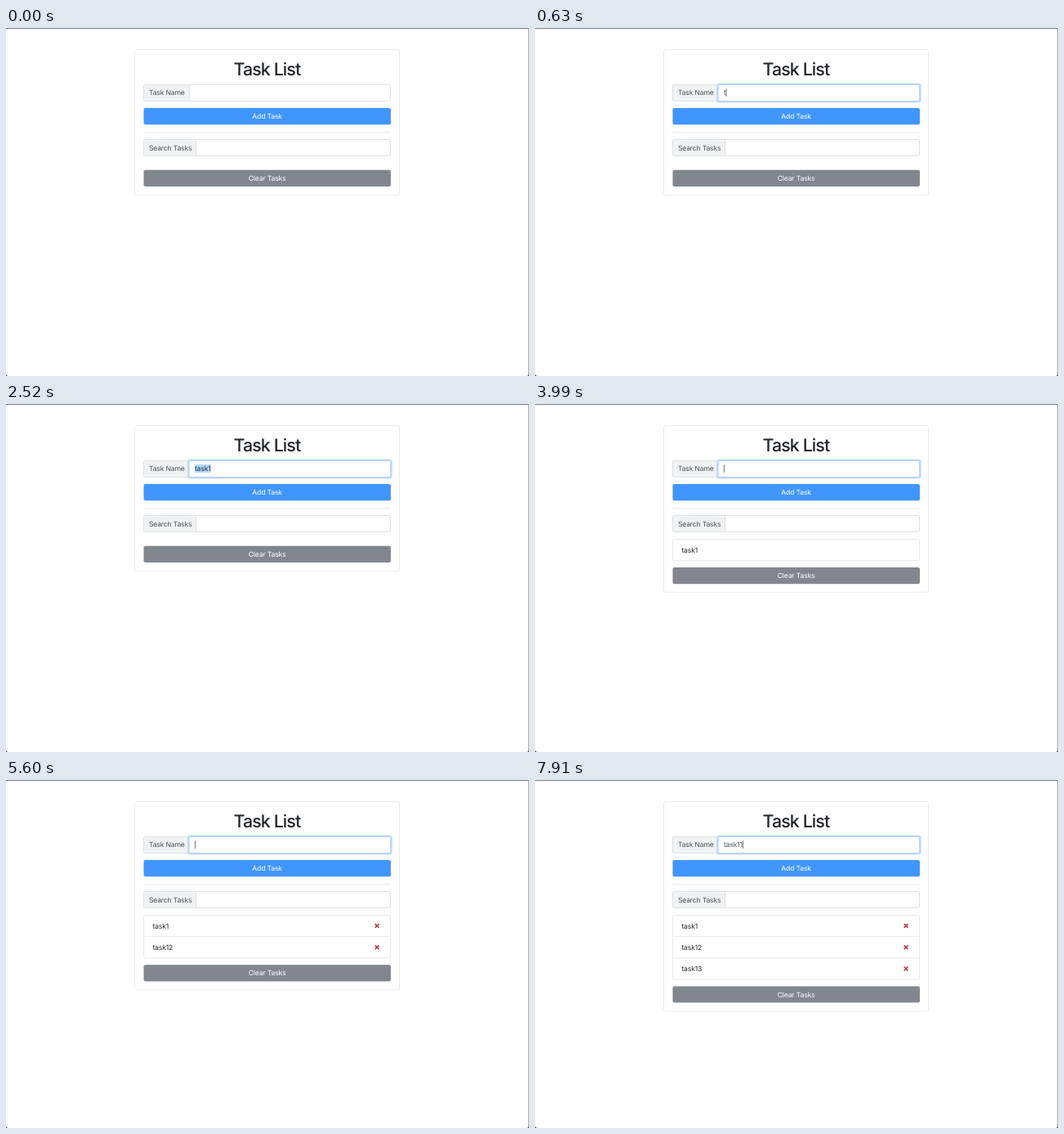
Recreate the animation shown at these times as an HTML page. Size 640 px wide and 426 px high, loop 8 s.

```html
<!DOCTYPE html>
<html lang="en">
<head>
<meta charset="utf-8">
<title>Task List</title>
<style>
  html, body { margin: 0; width: 100%; height: 100%; overflow: hidden; background: #fff; }
  svg { display: block; width: 640px; height: 426px; }
  text {
    font: 8.55px Inter, Roboto, sans-serif;
    font-optical-sizing: none;
    letter-spacing: -.016em;
    text-rendering: geometricPrecision;
    fill: #495057;
    white-space: pre;
  }
  .title { font-size: 21.4px; font-weight: 500; letter-spacing: -.042em; fill: #212529; }
  .mid { text-anchor: middle; }
  .btn { fill: #fff; }
  .box { fill: #fff; stroke: #dfe2e5; }
  .addon { fill: #f1f2f3; stroke: #dfe2e5; }
  .list { fill: #fff; stroke: #e9e9e9; }
  .row text { fill: #212529; }
  .cross { stroke: #ad4756; stroke-width: 1.7; fill: none; }
</style>
</head>
<body>
<svg viewBox="0 0 640 426">
  <rect id="card" x="157.5" y="26.5" width="324" rx="2.5" fill="#fff" stroke="#ececec"/>
  <text class="title mid" x="319.4" y="58">Task List</text>

  <rect class="box" x="168.5" y="69.5" width="302" height="20" rx="2"/>
  <path class="addon" d="M224.5 69.5H170.5a2 2 0 0 0-2 2v16a2 2 0 0 0 2 2H224.5z"/>
  <text x="174.9" y="82.4">Task Name</text>
  <g id="focus">
    <rect x="222.9" y="68.4" width="248.8" height="22.2" rx="2.4" fill="none" stroke="#bfdeff" stroke-width="1.9"/>
    <rect x="224" y="69.5" width="246.6" height="20" rx="1.6" fill="#fff" stroke="#8fc3fb" stroke-width=".7"/>
  </g>
  <rect id="mark" x="231" y="74" height="10" fill="#b3d7fe"/>
  <text id="field" x="230.9" y="82.4"></text>
  <rect id="caret" y="74.4" width=".8" height="9.4" fill="#50565c"/>

  <rect x="168.5" y="98" width="302.4" height="20.2" rx="2" fill="#4196fd"/>
  <text class="btn mid" x="319.6" y="111.3">Add Task</text>
  <path d="M168.5 127.5H471" stroke="#e9e9e9"/>

  <rect class="box" x="168.5" y="136.5" width="302" height="20" rx="2"/>
  <path class="addon" d="M232.5 136.5H170.5a2 2 0 0 0-2 2v16a2 2 0 0 0 2 2H232.5z"/>
  <text x="174.9" y="149.7">Search Tasks</text>

  <rect id="list" class="list" x="168.5" y="165.5" width="302" rx="2"/>
  <g id="rows"></g>

  <g id="clear">
    <rect x="168.5" y="173.8" width="302.4" height="20.2" rx="2" fill="#82878f"/>
    <text class="btn mid" x="319.6" y="187">Clear Tasks</text>
  </g>

  <path d="M0 .5H640" stroke="#777"/>
  <path d="M639.5 0V426" stroke="#aaa"/>
  <path d="M0 423q0 3 3 3H0zM640 423q0 3-3 3h3z" fill="#333"/>
</svg>
<script>
const LOOP = 8000, PITCH = 26.2, TEXT_X = 231;
const $ = id => document.getElementById(id);

// time, field text, mode
const typing = [
  [0, '', ''], [280, '', 'caret'], [630, 't', 'caret'], [840, 'ta', 'caret'],
  [1120, 'tas', 'caret'], [1190, 'task', 'caret'], [1540, 'task1', 'caret'],
  [2030, 'task1', ''], [2520, 'task1', 'select'],
  [3990, '', 'caret'], [4480, '', ''], [4760, 'task1', 'caret'],
  [5250, 'task1', ''], [5320, 'task12', 'caret'],
  [5600, '', 'caret'], [5880, 'task1', 'caret'], [6370, 'task1', ''],
  [6580, 'task13', 'caret'], [7140, '', 'caret'],
  [7420, 'task1', 'caret'], [7910, 'task11', 'caret']
];

// name, time added, time its delete icon shows
const tasks = [['task1', 3990, 4060], ['task12', 5600, 5600], ['task13', 7140, 7140]];

$('rows').innerHTML = tasks.map(([name], i) => `
  <g class="row" transform="translate(0 ${i * PITCH})">
    ${i ? '<path class="list" d="M168.5 165.5H470.5"/>' : ''}
    <text x="179.4" y="181.6">${name}</text>
    <path class="cross" d="M451.6 176.1l4.8 4.8m0-4.8l-4.8 4.8"/>
  </g>`).join('');
const rows = [...document.querySelectorAll('.row')];

const show = (el, on) => el.setAttribute('visibility', on ? 'inherit' : 'hidden');

function draw(t) {
  const [, text, mode] = typing.findLast(s => s[0] <= t);
  const field = $('field');
  if (field.textContent !== text) field.textContent = text;
  field.style.fill = mode === 'select' ? '#1d2b3d' : '';
  const width = text ? field.getComputedTextLength() : 0;
  $('caret').setAttribute('x', TEXT_X + width);
  $('mark').setAttribute('width', width);
  show($('caret'), mode === 'caret');
  show($('mark'), mode === 'select');

  const tick = Math.floor(t / 70) * 70;
  $('focus').setAttribute('opacity', Math.min(1, Math.max(0, (tick - 210) / 210)));

  let count = 0;
  tasks.forEach(([, added, icon], i) => {
    if (t >= added) count++;
    show(rows[i], t >= added);
    show(rows[i].querySelector('.cross'), t >= icon);
  });
  const grow = count * PITCH;
  show($('list'), count);
  $('list').setAttribute('height', grow);
  $('card').setAttribute('height', 178 + grow);
  $('clear').setAttribute('transform', `translate(0 ${grow})`);
}

const start = performance.now();
function loop() {
  draw((performance.now() - start) % LOOP);
  requestAnimationFrame(loop);
}
loop();
</script>
</body>
</html>
```
